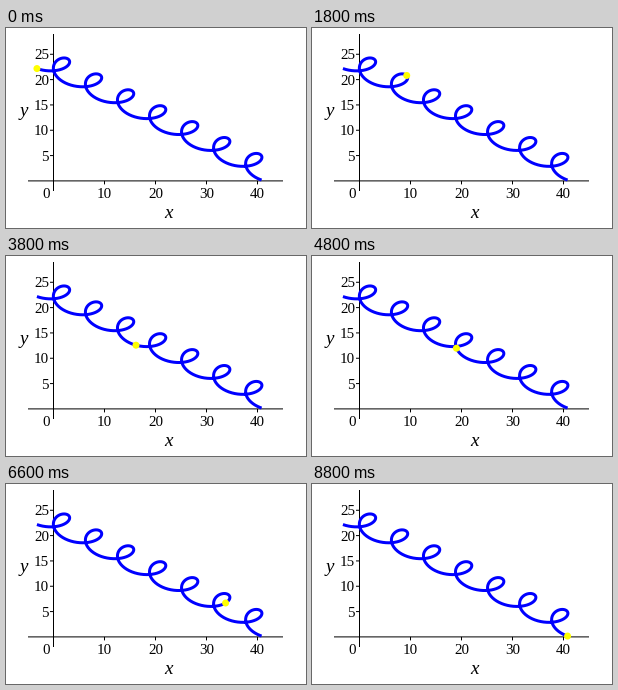
Recreate the animation shown at these times as a matplotlib script. Size 300x200 px, loop 9000 ms.

```python
import numpy as np
import matplotlib.pyplot as plt
from matplotlib.animation import FuncAnimation
from matplotlib.patches import Circle

W, H, DPI = 300, 200, 100
PX = 72 / DPI              # points per pixel
X0, Y0 = 47.5, 152.9       # origin of the graph
UX, UY = 5.1, 5.065        # pixels per unit
T0, T1 = -2, 42


def to_px(x, y):
    return X0 + UX * x, Y0 - UY * y


def position(t):
    """Looping path: a slanted drift plus an ellipse."""
    return to_px(t + 3 * np.cos(t), 23 - t / 2 + 2 * np.sin(t))


fig = plt.figure(figsize=(W / DPI, H / DPI), dpi=DPI, facecolor="white")
ax = fig.add_axes([0, 0, 1, 1])
ax.set_xlim(0, W)
ax.set_ylim(H, 0)
ax.axis("off")


def line(xs, ys):
    ax.plot(xs, ys, color="black", lw=PX, solid_capstyle="butt",
            snap=False, zorder=1)


def label(x, y, text, size=15, **kw):
    ax.text(x, y, text, family="Liberation Serif", fontsize=size * PX,
            va="baseline", zorder=1, **kw)


# Axes, ticks and labels
line([22, 277], [Y0, Y0])
line([X0, X0], [6, 163])
for v in range(10, 50, 10):
    x, _ = to_px(v, 0)
    line([x, x], [Y0, Y0 + 3.5])
    label(x, 170, str(v), ha="center")
for v in range(5, 30, 5):
    _, y = to_px(0, v)
    line([X0 - 3.5, X0], [y, y])
    label(43, y + 5, str(v), ha="right")
label(40, 170, "0", ha="center")
label(162.3, 190, "x", 19, style="italic", ha="center")
label(17.5, 87.5, "y", 19, style="italic", ha="center")

ax.plot(*position(np.linspace(T0, T1, 1200)), color="#0000ff", lw=3 * PX,
        solid_capstyle="butt", zorder=2)
dot = ax.add_patch(Circle(position(T0), 3.5, fc="yellow", ec="none", lw=0, zorder=3))


def update(i):
    dot.center = position(T0 + i)
    return dot,


anim = FuncAnimation(fig, update, frames=T1 - T0 + 1, interval=200,
                     repeat=True, repeat_delay=0)
plt.show()
```
